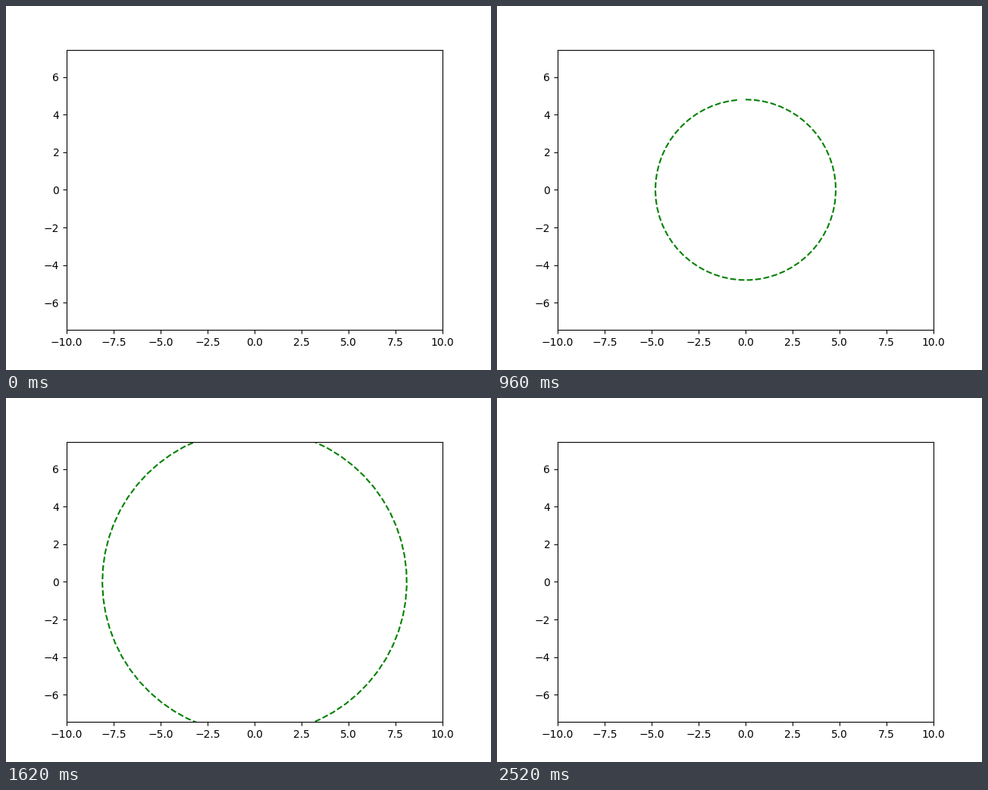
Recreate the animation shown at these times as a matplotlib script. Size 640 px wide and 480 px high, loop 3000 ms.

```python
import numpy as np
import matplotlib.pyplot as plt
from matplotlib.animation import FuncAnimation

FRAMES = 100
INTERVAL = 30
GROWTH = 0.15  # radius gained per frame
HALF_WIDTH = 10

fig, ax = plt.subplots(figsize=(6.4, 4.8), dpi=100)

# Same scale on both axes
box = ax.get_window_extent()
half_height = HALF_WIDTH * box.height / box.width
ax.set_xlim(-HALF_WIDTH, HALF_WIDTH)
ax.set_ylim(-half_height, half_height)

# Clockwise from the top; the step leaves the ring slightly open
theta = np.arange(0, 2 * np.pi, 0.1)
ring, = ax.plot([], [], "g--", lw=1.5)


def update(frame):
    radius = GROWTH * frame
    ring.set_data(radius * np.sin(theta), radius * np.cos(theta))
    return ring,


anim = FuncAnimation(fig, update, frames=FRAMES, interval=INTERVAL,
                     repeat=True, repeat_delay=0)
plt.show()
```
